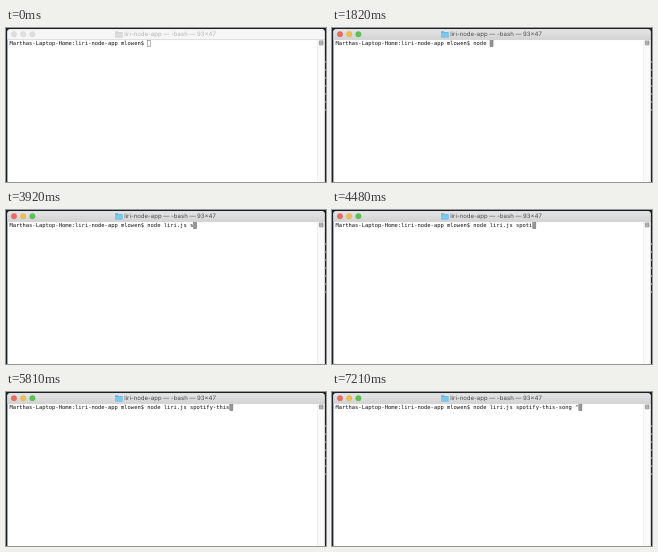
An HTML page for the animation above (8 s loop, 320x154 px).

```html
<!DOCTYPE html>
<html lang="en">
<head>
<meta charset="utf-8">
<title>Terminal</title>
<style>
html, body { margin: 0; width: 100%; height: 100%; overflow: hidden; background: #17232c; }
svg { display: block; width: 100vw; height: 100vh; }
text { text-rendering: geometricPrecision; white-space: pre; }
.title { font: 6.04px Inter, "Open Sans", sans-serif; fill: #4c4c4c; }
.shell { font: 5.465px "DejaVu Sans Mono", monospace; fill: #111; }
.bar { fill: url(#active); }
.cursor { fill: #969696; stroke: #777; stroke-width: .6; }
.idle .bar { fill: #f6f6f6; }
.idle .title { fill: #b4b4b4; }
.idle .folder { opacity: .45; filter: grayscale(1); }
.idle .light { fill: #dedede; stroke: #d0d0d0; }
.idle .cursor { fill: #fff; stroke: #858585; }
.light { stroke-width: .4; }
</style>
</head>
<body>
<svg id="win" class="idle" viewBox="0 0 320 154">
  <defs>
    <linearGradient id="active" x2="0" y2="1">
      <stop stop-color="#e6e5e6"/><stop offset="1" stop-color="#d4d3d4"/>
    </linearGradient>
  </defs>
  <path stroke="#6f7a80" stroke-dasharray="2 6" d="M319.5 33V84"/>
  <path fill="#fff" d="M1.4 154V4Q1.4 1.3 4 1.3H316Q318.6 1.3 318.6 4V154Z"/>
  <path class="bar" d="M1.4 11.5V4Q1.4 1.3 4 1.3H316Q318.6 1.3 318.6 4V11.5Z"/>
  <path stroke="#bdbdbd" stroke-width=".5" d="M1.4 11.6H318.6"/>
  <circle class="light" cx="8" cy="6.2" r="2.7" fill="#e96d62" stroke="#d65c53"/>
  <circle class="light" cx="17.2" cy="6.2" r="2.7" fill="#edbf4f" stroke="#d8a844"/>
  <circle class="light" cx="26.4" cy="6.2" r="2.7" fill="#5cc253" stroke="#4bae45"/>
  <g class="folder">
    <path fill="#5fb3dc" d="M109 3.2h2.8l.8.8h3.9v5.4H109Z"/>
    <path fill="#7cc8ec" d="M109 4.7h7.5v4.7H109Z"/>
  </g>
  <text class="title" x="118.2" y="8.4">liri-node-app — -bash — 93×47</text>
  <path fill="#fafafa" d="M311.6 12H318.6V154H311.6Z"/>
  <path stroke="#e6e6e6" stroke-width=".6" d="M311.6 12V154"/>
  <path fill="#c8c8c8" stroke="#777" stroke-width=".6" d="M313.4 12.9h3.6v4h-3.6ZM313.4 14.9h3.6"/>
  <rect class="cursor" id="cursor" y="12.4" width="3" height="6.2"/>
  <text class="shell" id="line" x="3.4" y="17.2"></text>
</svg>
<script>
const LOOP = 8000, FOCUS = 560, LEFT = 3.4, ADVANCE = 3.29;
const prompt = "Marthas-Laptop-Home:liri-node-app mlowen$ ";
const command = 'node liri.js spotify-this-song "';
// The repeated time is a tab completion: five characters appear at once.
const keys = [
  1330, 1400, 1540, 1680, 1820,
  2030, 2170, 2240, 2450, 2450, 2450, 2450, 2450,
  3920, 4060, 4130, 4410, 4480, 4690, 4760, 5390,
  5530, 5670, 5740, 5810, 6090, 6300, 6370, 6510, 6650, 6860, 7210
];
const [win, line, cursor] = ["win", "line", "cursor"].map(id => document.getElementById(id));
const start = performance.now();

function draw(now) {
  const t = Math.max(0, now - start) % LOOP;
  const typed = keys.filter(k => k <= t).length;
  const shown = prompt + command.slice(0, typed);
  win.classList.toggle("idle", t < FOCUS);
  line.textContent = shown;
  cursor.setAttribute("x", LEFT + shown.length * ADVANCE);
  requestAnimationFrame(draw);
}
draw(start);
</script>
</body>
</html>
```
